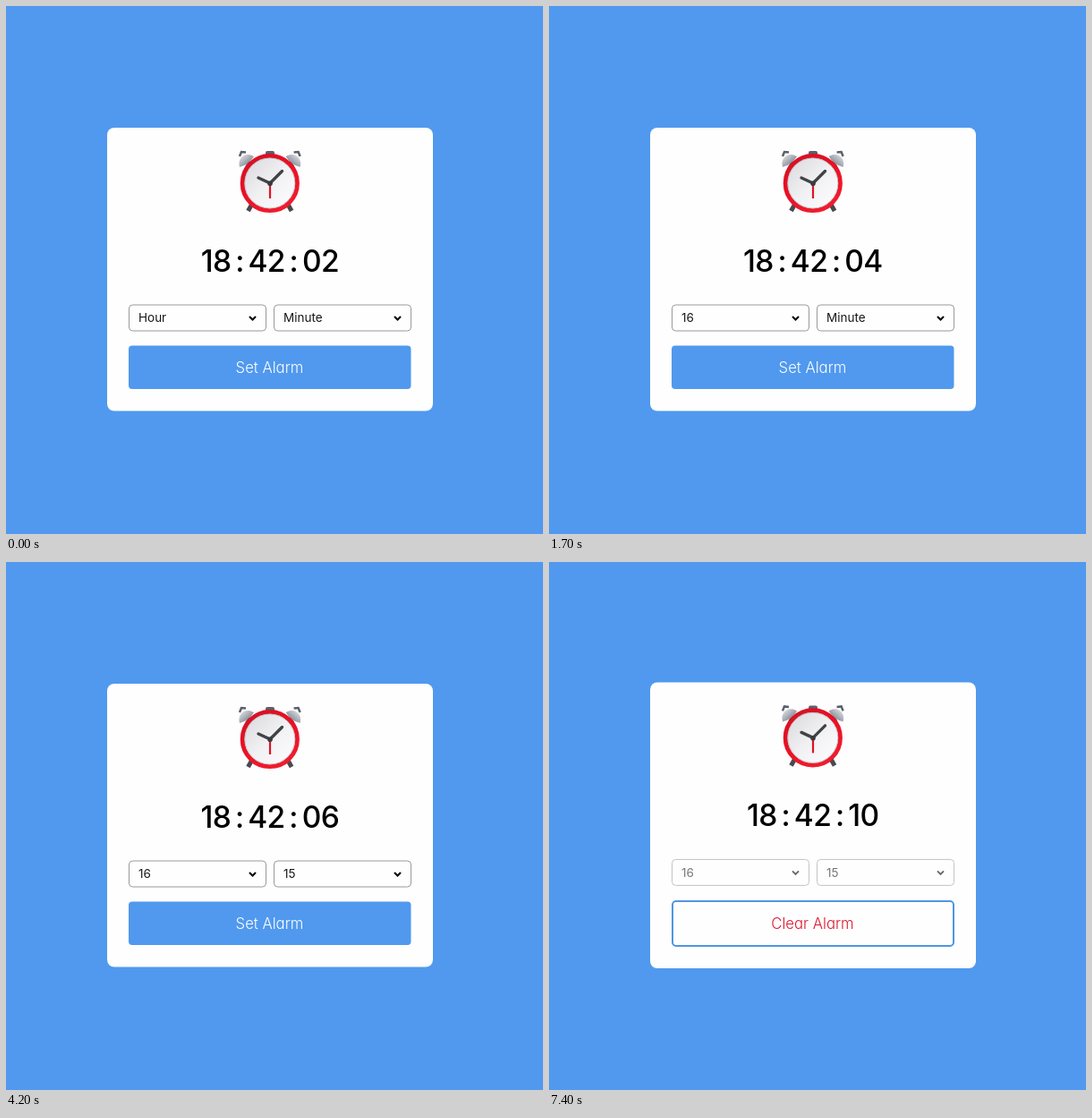
An HTML page that plays this animation: 600x590 px, repeating every 8 s.

```html
<!DOCTYPE html>
<html lang="en">
<head>
<meta charset="utf-8">
<title>Alarm clock</title>
<style>
  html, body { margin: 0; width: 100%; height: 100%; overflow: hidden; background: #5099ef; }
  svg { display: block; width: 600px; height: 590px; }
  text { font-family: Inter, "Open Sans", sans-serif; font-feature-settings: "cv11"; font-size: 13.5px; fill: #17171c; }
  #time { font-size: 33.5px; font-weight: 500; letter-spacing: -.6px; word-spacing: -3.6px; text-anchor: middle; fill: #000; }
  #label { font-size: 16.7px; font-weight: 300; text-anchor: middle; }
  .box { fill: #fffefe; stroke: #999; }
  .arrow { fill: none; stroke: #000; stroke-width: 2; }
  .disabled { opacity: .58; }
  .popup { filter: drop-shadow(1px 2px 3px rgba(0, 0, 0, .35)); }
</style>
</head>
<body>
<svg viewBox="0 0 600 590">
  <defs>
    <linearGradient id="metal" x2="1" y2="1">
      <stop stop-color="#eceef1"/><stop offset=".5" stop-color="#a4a9b1"/><stop offset="1" stop-color="#555c67"/>
    </linearGradient>
    <linearGradient id="face" x2="1" y2="1">
      <stop stop-color="#d6d6da"/><stop offset=".5" stop-color="#f1f1f4"/><stop offset="1" stop-color="#fff"/>
    </linearGradient>
    <linearGradient id="rim" x2=".6" y2="1">
      <stop stop-color="#d21224"/><stop offset=".5" stop-color="#ea1024"/><stop offset="1" stop-color="#f01c2d"/>
    </linearGradient>
    <g id="bell">
      <path d="M269 180 L273 174" stroke="#4b4e55" stroke-width="4"/>
      <path d="M261 180 C258 170 267 162 277 168 Q272 177 261 180Z" fill="url(#metal)"/>
      <path d="M261 168 L263 163 L268 163.500" fill="none" stroke="#59606a" stroke-width="2.500"/>
      <path d="M275 221 L270.500 229" stroke="#494a50" stroke-width="5"/>
    </g>
  </defs>
  <rect id="card" x="113" width="364" rx="8" fill="#fffefe"/>
  <g id="body">
    <g id="clock">
      <use href="#bell"/>
      <use href="#bell" transform="matrix(-1 0 0 1 589.600 0)"/>
      <rect x="290" y="162" width="10" height="6" rx="2" fill="#5b6069"/>
      <circle cx="294.800" cy="198" r="30.700" fill="url(#face)" stroke="url(#rim)" stroke-width="4.800"/>
      <circle cx="294.800" cy="198" r="28" fill="none" stroke="#b8bbc0" stroke-width=".8"/>
      <path d="M295 198.500 V215" stroke="#e01425" stroke-width="2.200"/>
      <path d="M282 192 L295 198 L308.500 184.500" fill="none" stroke="#414347" stroke-width="3.400" stroke-linecap="round" stroke-linejoin="round"/>
      <circle cx="295" cy="198.300" r="2.800" fill="#393b40"/>
    </g>
    <text id="time" x="294.800" y="296.500"></text>
    <g id="fields"></g>
  </g>
  <rect id="button" x="137" rx="4"/>
  <text id="label" x="294.500" y="410"></text>
  <g id="popups"></g>
</svg>
<script>
const LOOP = 8000, ROW = 21, FIRST_ROW = 0.5;
const $ = id => document.getElementById(id);

// [time, value] steps; each value holds until the next one
const seconds = [[0, 2], [500, 3], [1400, 4], [2400, 5], [3400, 6], [4500, 7], [5400, 8], [6400, 9], [7400, 10]];
const menus = [
  { name: "Hour", x: 137, thumb: 259, open: 500, close: 1600, value: 16,
    hover: [[0, 0], [800, 19], [900, 18], [1000, 17], [1300, 16]] },
  { name: "Minute", x: 299, thumb: 61, open: 2300, close: 4200, value: 15,
    hover: [[0, 0], [2700, 19], [2800, 18], [2900, 17], [3100, 16], [3400, 15]] }
];
const ALARM_SET = 5600;

const pad = n => String(n).padStart(2, "0");
const stepAt = (steps, t) => steps.filter(s => s[0] <= t).pop()[1];
const setAttrs = (el, attrs) => {
  for (const key in attrs) el.setAttribute(key, attrs[key]);
};

function add(parent, tag, attrs, text = "") {
  const el = document.createElementNS("http://www.w3.org/2000/svg", tag);
  setAttrs(el, attrs);
  el.textContent = text;
  return parent.appendChild(el);
}

function buildField(menu) {
  const { x } = menu;
  add($("fields"), "rect", { class: "box", x: x + .5, y: 334, width: 153, height: 29, rx: 4 });
  menu.text = add($("fields"), "text", { x: x + 11, y: 353.3 }, menu.name);
  add($("fields"), "path", { class: "arrow", d: `M${x + 135} 347 l3.500 3.500 l3.500 -3.500` });
}

function buildPopup(menu) {
  const x = menu.x + 9, bar = x + 124;
  const g = menu.popup = add($("popups"), "g", { class: "popup" });
  add(g, "rect", { x: x + .5, y: -20, width: 134.5, height: 357.5, fill: "#fffefe", stroke: "#777b82" });
  menu.mark = add(g, "rect", { x: x + 1, width: 122, height: ROW, fill: "#1c64c8" });
  add(g, "rect", { x: bar - 1, y: -10, width: 11.5, height: 347, fill: "#f1f1f1" });
  add(g, "rect", { x: bar, y: -10, width: 9.5, height: menu.thumb + 10, fill: "#c1c1c1" });
  add(g, "path", { d: `M${bar + 2} 329.500 h6 l-3 3.500z`, fill: "#505050" });
  menu.rows = [];
  for (let n = 4; n < 20; n++) {
    menu.rows[n] = add(g, "text", { x: x + 3.5, y: FIRST_ROW + (n - 4) * ROW + 15.4 }, pad(n));
  }
}

function drawMenu(menu, t) {
  const hover = stepAt(menu.hover, t);
  menu.text.textContent = t < menu.close ? menu.name : menu.value;
  menu.popup.style.display = t >= menu.open && t < menu.close ? "" : "none";
  menu.mark.setAttribute("y", FIRST_ROW + (hover - 4) * ROW + .5);
  menu.rows.forEach((row, n) => { row.style.fill = n === hover ? "#f0f5fd" : ""; });
}

function draw(t) {
  const set = t >= ALARM_SET;
  $("time").textContent = `18 : 42 : ${pad(stepAt(seconds, t))}`;
  setAttrs($("card"), set ? { y: 134.5, height: 319.5 } : { y: 136, height: 316.5 });
  setAttrs($("body"), { transform: `translate(0 ${set ? -1.6 : 0})` });
  setAttrs($("fields"), { class: set ? "disabled" : "" });
  setAttrs($("button"), set
    ? { x: 138, y: 379, width: 314, height: 50, fill: "#fffefe", stroke: "#4f96e4", "stroke-width": 2 }
    : { x: 137, y: 379.5, width: 315.5, height: 48.5, fill: "#5099ef", stroke: "none" });
  $("label").textContent = set ? "Clear Alarm" : "Set Alarm";
  $("label").style.fill = set ? "#db1830" : "#fff";
  menus.forEach(menu => drawMenu(menu, t));
}

menus.forEach(menu => { buildField(menu); buildPopup(menu); });
const start = performance.now();
function tick() {
  draw((performance.now() - start) % LOOP);
  requestAnimationFrame(tick);
}
tick();
</script>
</body>
</html>
```
